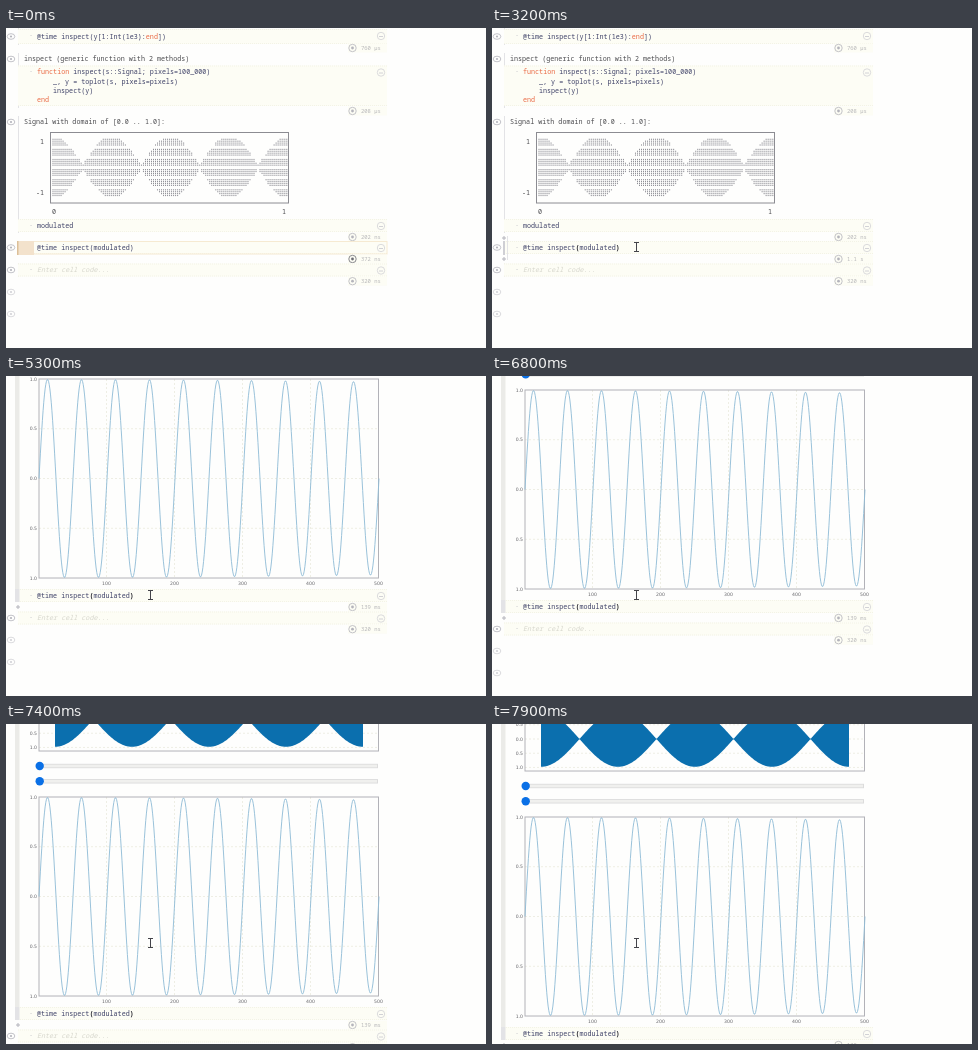
Animation, 480 px wide and 320 px high, one loop 8 s. Source, as an HTML page with a canvas:

```html
<!DOCTYPE html>
<html lang="en">
<head>
<meta charset="utf-8">
<title>Notebook signal inspection</title>
<style>
html, body { margin: 0; width: 100%; height: 100%; overflow: hidden; background: #fefefd; }
canvas { display: block; width: 480px; height: 320px; }
</style>
</head>
<body>
<canvas id="stage"></canvas>
<script>
const LOOP = 8000, STEP = 100;
const PAPER = '#fefefd', CELL = '#fdfdf5', EDGE = '#f3f3e6', GRID = '#eeeee4', RAIL = '#e3e3e6';
const CODE = '#3f4268', KEYWORD = '#ea6a45', OUTPUT = '#4a4a4e', ICON = '#b4b4bc', FAINT = '#d2d2d6';
const canvas = document.getElementById('stage');
const ratio = window.devicePixelRatio || 1;
canvas.width = 480 * ratio;
canvas.height = 320 * ratio;
const ctx = canvas.getContext('2d');

function rect(x, y, w, h, color) {
  ctx.fillStyle = color;
  ctx.fillRect(x, y, w, h);
}

function outline(x, y, w, h, color) {
  ctx.strokeStyle = color;
  ctx.lineWidth = 1;
  ctx.strokeRect(x, y, w, h);
}

function line(x1, y1, x2, y2, color, dash = []) {
  ctx.strokeStyle = color;
  ctx.lineWidth = 1;
  ctx.setLineDash(dash);
  ctx.beginPath();
  ctx.moveTo(x1, y1);
  ctx.lineTo(x2, y2);
  ctx.stroke();
  ctx.setLineDash([]);
}

function circle(x, y, r, color, filled) {
  ctx.beginPath();
  ctx.arc(x, y, r, 0, 2 * Math.PI);
  ctx.lineWidth = 0.8;
  ctx.fillStyle = ctx.strokeStyle = color;
  filled ? ctx.fill() : ctx.stroke();
}

// y is the vertical middle of the line.
function text(str, x, y, color, { size = 6.72, style = '', align = 'left', family = '"Noto Sans Mono", monospace' } = {}) {
  ctx.font = `${style} ${size}px ${family}`;
  ctx.textAlign = align;
  ctx.fillStyle = color;
  ctx.fillText(str, x, y + size * 0.34);
}

// Draws [string, color, style] parts one after another.
function runs(parts, x, y) {
  for (const [str, color = CODE, style = ''] of parts) {
    text(str, x, y, color, { style });
    x += ctx.measureText(str).width;
  }
}

function eye(y, color = ICON) {
  ctx.beginPath();
  ctx.ellipse(5, y, 3.8, 2.8, 0, 0, 2 * Math.PI);
  ctx.strokeStyle = color;
  ctx.lineWidth = 0.8;
  ctx.stroke();
  circle(5, y, 1.1, color, true);
}

function plus(x, y) {
  line(x - 2, y, x + 2, y, ICON);
  line(x, y - 2, x, y + 2, ICON);
}

function cell(top, bottom) {
  rect(12, top, 369, bottom - top, CELL);
  line(12, top + 0.5, 381, top + 0.5, EDGE, [1, 1]);
  line(12, bottom - 0.5, 381, bottom - 0.5, EDGE, [1, 1]);
  text('·', 23, top + 6.5, ICON);
  circle(375, top + 7, 3.7, FAINT);
  line(373, top + 7.5, 377, top + 7.5, FAINT);
}

function runtime(y, label, strong) {
  const color = strong ? '#6c6c74' : ICON;
  rect(342, y - 4.5, 39, 9, CELL);
  circle(346.5, y, 3.7, color);
  circle(346.5, y, 1.4, color, true);
  text(label, 355, y, '#b6b6b8', { size: 5.5 });
}

function callCell(y, matched) {
  cell(y - 6.5, y + 6.5);
  const style = matched ? 'bold' : '';
  const bracket = matched ? '#202028' : CODE;
  runs([['@time '], ['inspect'], ['(', bracket, style], ['modulated'], [')', bracket, style]], 31, y);
}

function emptyCell(y) {
  cell(y - 6.5, y + 6.5);
  text('Enter cell code...', 31, y, '#d6d6cc', { style: 'italic' });
  runtime(y + 11.2, '320 ns');
  eye(y);
  eye(y + 22, FAINT);
  eye(y + 44, FAINT);
}

function brailleChart() {
  outline(44.5, 104.5, 238, 70.5, '#8c8c92');
  for (let i = 0; i < 118; i++) {
    const x = 46.5 + i * 2.01;
    const reach = 29 * Math.abs(Math.cos(Math.PI * (x - 47) / 58.5));
    for (let k = 0; k < 24; k++) {
      const y = 110.7 + Math.floor(k / 4) * 10.1 + (k % 4) * 1.9;
      if (Math.abs(y - 138.5) <= reach + 2) rect(x, y, 1, 1.2, '#8f8f96');
    }
  }
  text('1', 38, 114, OUTPUT, { align: 'right' });
  text('-1', 38, 164.5, OUTPUT, { align: 'right' });
  text('0', 46, 184, OUTPUT);
  text('1', 276, 184, OUTPUT);
}

function notebook(t) {
  for (const [a, b] of [[0, 17], [25, 80], [88, 205], [213, 227], [235, 249]])
    line(12.5, a, 12.5, b, RAIL);
  cell(1, 16);
  runs([['@time inspect(y[1:Int(1e3):'], ['end', KEYWORD], ['])']], 31, 8.5);
  runtime(20, '760 μs');
  eye(8.5);

  text('inspect (generic function with 2 methods)', 18, 31, OUTPUT);
  eye(31);
  cell(37.5, 78);
  runs([['function', KEYWORD], [' inspect(s::Signal; pixels=100_000)']], 31, 44);
  text('_, y = toplot(s, pixels=pixels)', 47, 53.3, CODE);
  text('inspect(y)', 47, 62.5, CODE);
  text('end', 31, 72, KEYWORD);
  runtime(83, '208 μs');

  text('Signal with domain of [0.0 .. 1.0]:', 18, 94, OUTPUT);
  eye(94);
  brailleChart();
  cell(191, 204);
  text('modulated', 31, 197.5, CODE);
  runtime(209, '202 ns');

  const focused = t >= 1000;
  callCell(219.5, focused);
  eye(219.5);
  if (t < 500) {
    outline(12, 213.5, 369, 12.5, '#f6ead2');
    rect(11, 213, 17, 14, '#f3e2cc');
    rect(11, 213, 1.5, 14, '#dcbf98');
  }
  if (focused) {
    rect(11, 213, 2, 14, '#cfcfd4');
    line(15.5, 208, 15.5, 232, RAIL);
    plus(12, 210);
    plus(12, 231);
  }
  const elapsed = Math.max(0.1, (t - 2100) / 1000).toFixed(1);
  runtime(231, t < 2400 ? '372 ns' : `${elapsed} s`, t < 500);
  emptyCell(242);
}

function axisLabel(str, x, y, align) {
  text(str, x, y, '#66666a', { size: 4.6, align, family: '"DejaVu Sans", sans-serif' });
}

function frame(top, height) {
  outline(33, top, 339.5, height, '#b2b2b8');
}

function wavePlot(top) {
  const mid = top + 99.5, right = 372.5, unit = 0.68;
  for (let n = 100; n <= 500; n += 100) {
    const x = 32.5 + n * unit;
    if (n < 500) line(x, top, x, top + 199, GRID, [2, 2]);
    axisLabel(n, x, top + 204.2, 'center');
  }
  ['1.0', '0.5', '0.0', '0.5', '1.0'].forEach((label, i) => {
    const y = top + i * 49.75;
    if (i % 4) line(33, y, right, y, GRID, [2, 2]);
    axisLabel(label, 31, y, 'right');
  });
  frame(top, 199);
  ctx.beginPath();
  for (let n = 0; n <= 500; n++) {
    const value = Math.cos(n * 0.00045) * Math.sin(n * Math.PI / 25);
    ctx.lineTo(33 + n * unit, mid - 99 * value);
  }
  ctx.strokeStyle = '#8fbbd6';
  ctx.lineWidth = 0.9;
  ctx.stroke();
}

function envelopePlot(bottom) {
  const mid = bottom - 32;
  ['0.5', '0.0', '0.5', '1.0'].forEach((label, i) => {
    const y = mid + (i - 1) * 14.2;
    line(33, y, 372, y, GRID, [2, 2]);
    axisLabel(label, 31, y, 'right');
  });
  const reach = x => 27.8 * Math.abs(Math.cos(Math.PI * (x - 49) / 77));
  ctx.beginPath();
  for (let x = 49; x <= 357; x++) ctx.lineTo(x, mid - reach(x));
  for (let x = 357; x >= 49; x--) ctx.lineTo(x, mid + reach(x));
  ctx.fillStyle = '#0b6fae';
  ctx.fill();
  frame(bottom - 64, 64);
}

function slider(y) {
  rect(33, y - 2.2, 339, 4.4, '#dcdcdc');
  rect(34, y - 1.3, 337, 2.6, '#f0f0ee');
  circle(33.7, y, 4.2, '#0a70e6', true);
}

function plots(t, shift) {
  const top = 3 + shift;
  rect(9, 0, 4.5, 222.5 + shift, '#ebebe8');
  envelopePlot(top - 46);
  slider(top - 31);
  slider(top - 15.7);
  wavePlot(top);
  callCell(219.5 + shift, true);
  rect(9, 213 + shift, 4.5, 13, RAIL);
  plus(12, 231 + shift);
  runtime(231 + shift, t < 5100 ? '1.1 s' : '139 ms');
  emptyCell(242 + shift);
}

// Cubic through [time, offset, slope] points.
const SCROLL = [[6300, 0, 0], [6800, 11, 0.055], [7200, 51, 0.1], [7600, 84, 0.045], [7900, 90, 0]];
function scrollAt(t) {
  if (t <= SCROLL[0][0]) return 0;
  const i = SCROLL.findIndex(p => p[0] >= t);
  if (i < 0) return 90;
  const [ta, a, sa] = SCROLL[i - 1], [tb, b, sb] = SCROLL[i];
  const d = tb - ta, u = (t - ta) / d, v = 1 - u;
  return a * v * v * (1 + 2 * u) + b * u * u * (3 - 2 * u) + d * u * v * (sa * v - sb * u);
}

function pointer(t) {
  if (t < 100) return;
  const u = Math.min(1, (t - 100) / 400);
  const ease = u * u * (3 - 2 * u);
  const x = 268 + (144.5 - 268) * ease, y = 57 + (219 - 57) * ease;
  const color = '#44444a';
  line(x, y - 4.5, x, y + 4.5, color);
  line(x - 2.5, y - 4.5, x + 2.5, y - 4.5, color);
  line(x - 2.5, y + 4.5, x + 2.5, y + 4.5, color);
}

function draw(now) {
  const t = Math.floor((now % LOOP) / STEP) * STEP;
  ctx.setTransform(ratio, 0, 0, ratio, 0, 0);
  rect(0, 0, 480, 320, PAPER);
  if (t < 3300) notebook(t);
  else plots(t, Math.round(scrollAt(t)));
  pointer(t);
}

const start = performance.now();
function tick() {
  draw(performance.now() - start);
  requestAnimationFrame(tick);
}
tick();
</script>
</body>
</html>
```
